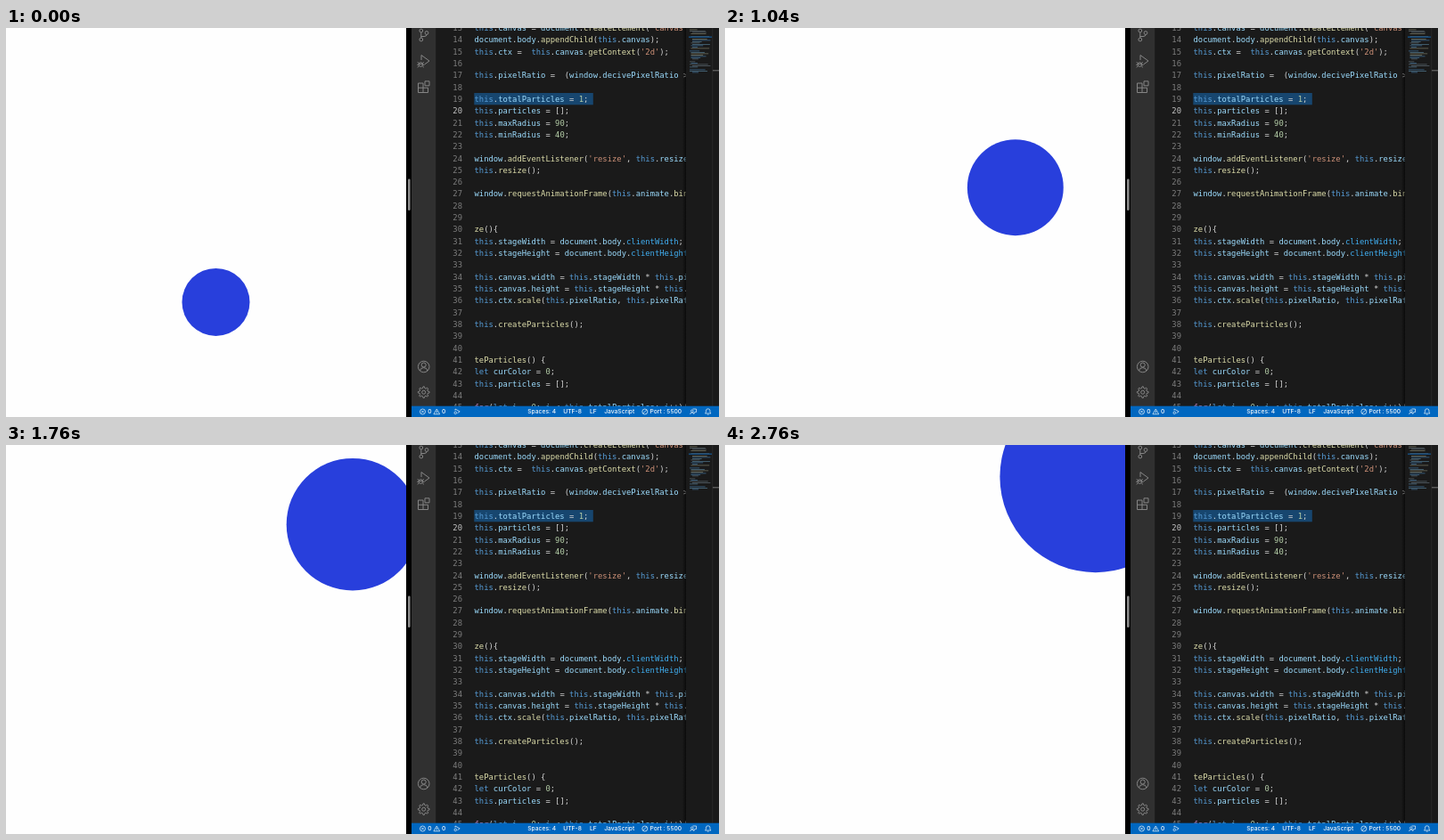
Animation, 800 px wide and 437 px high, one loop 2800 ms. Source, as an HTML page with a canvas:

```html
<!DOCTYPE html>
<html lang="en">
<head>
<meta charset="utf-8">
<style>
html, body { margin: 0; width: 100%; height: 100%; overflow: hidden; background: #fefefe; }
canvas { display: block; }
</style>
</head>
<body>
<canvas id="stage" width="800" height="437"></canvas>
<script>
const ctx = document.getElementById('stage').getContext('2d');
const LOOP = 2800, STEP = 40, PAGE_WIDTH = 449;
const CHAR = 5.328, LINE = 13.33;
const CODE_FONT = '8.85px "DejaVu Sans Mono", monospace';

const code = {
  13: "this.canvas = document.createElement('canvas');",
  14: "document.body.appendChild(this.canvas);",
  15: "this.ctx =  this.canvas.getContext('2d');",
  17: "this.pixelRatio =  (window.decivePixelRatio > 1) ? 2 : 1;",
  19: "this.totalParticles = 1;",
  20: "this.particles = [];",
  21: "this.maxRadius = 90;",
  22: "this.minRadius = 40;",
  24: "window.addEventListener('resize', this.resize.bind(this));",
  25: "this.resize();",
  27: "window.requestAnimationFrame(this.animate.bind(this));",
  30: "ze(){",
  31: "this.stageWidth = document.body.clientWidth;",
  32: "this.stageHeight = document.body.clientHeight;",
  34: "this.canvas.width = this.stageWidth * this.pixelRatio;",
  35: "this.canvas.height = this.stageHeight * this.pixelRatio;",
  36: "this.ctx.scale(this.pixelRatio, this.pixelRatio);",
  38: "this.createParticles();",
  41: "teParticles() {",
  42: "let curColor = 0;",
  43: "this.particles = [];",
  45: "for(let i = 0; i < this.totalParticles; i++){"
};

function rect(x, y, w, h, color) {
  ctx.fillStyle = color;
  ctx.fillRect(x, y, w, h);
}

function text(str, x, y, color) {
  ctx.fillStyle = color;
  ctx.fillText(str, x, y);
}

function stroke(path, color, width = 1) {
  ctx.strokeStyle = color;
  ctx.lineWidth = width;
  ctx.stroke(new Path2D(path));
}

const ring = (x, y, r) =>
  `M${x - r} ${y}a${r} ${r} 0 1 0 ${2 * r} 0a${r} ${r} 0 1 0 ${-2 * r} 0`;

function tokenColor(token, next) {
  if (/^'/.test(token)) return '#ce9178';
  if (/^(this|let)$/.test(token)) return '#569cd6';
  if (token === 'for') return '#c586c0';
  if (/^\d/.test(token)) return '#b5cea8';
  if (/^client/.test(token)) return '#40aef0';
  if (/^\w/.test(token)) return next === '(' ? '#dcdcaa' : '#9cdcfe';
  return '#d4d4d4';
}

function drawCode() {
  ctx.font = CODE_FONT;
  for (let n = 13; n <= 45; n++) {
    const y = 16.2 + (n - 14) * LINE;
    text(n, 512 - 2 * CHAR, y, n === 20 ? '#c6c6c6' : '#7d7d7d');
    for (const m of (code[n] || '').matchAll(/'[^']*'|\w+|[^\w\s']+/g)) {
      const next = code[n][m.index + m[0].length];
      text(m[0], 525.5 + m.index * CHAR, y, tokenColor(m[0], next));
    }
  }
}

function drawMinimap() {
  const shadow = ctx.createLinearGradient(759, 0, 763, 0);
  shadow.addColorStop(0, '#0000');
  shadow.addColorStop(1, '#0009');
  rect(759, 0, 4, 425, shadow);
  rect(763, 0, 37, 425, '#1a1a1a');
  let seed = 7;
  const random = () => (seed = seed * 16807 % 2147483647) / 2147483647;
  const tints = ['#4c7186', '#3d6a8f', '#737360', '#56626a'];
  for (let y = 0; y < 51; y += 1.5) {
    if (random() < 0.17) continue;
    const x = 767 + Math.floor(random() * 3) * 1.5;
    const w = 5 + random() * 17;
    rect(x, y, w, 0.75, tints[Math.floor(random() * 4)]);
  }
  rect(766, 9.5, 26, 1.3, '#17548a');
  rect(792.5, 0, 0.7, 425, '#303030');
  rect(793, 47.3, 7, 1, '#777');
}

function drawActivityBar() {
  rect(455, 0, 27.5, 425, '#303030');
  const gray = '#858585';
  stroke(ring(465.8, 3, 1.9) + ring(465.8, 13, 1.9) + ring(472, 5.5, 1.9)
    + 'M465.8 5V11M472 7.4Q472 9.5 469 9.5H465.8', gray);
  stroke('M466 36V30.5L475 37L469.5 41' + ring(465.3, 41, 2.3)
    + 'M461.7 38.5L463.4 39.6M461.3 41.4H463M461.7 44.2L463.4 42.8'
    + 'M468.9 38.5L467.2 39.6M469.3 41.4H467.6M468.9 44.2L467.2 42.8M463 40.4H467.6', gray);
  stroke('M462.5 62H468V72.5H462.5ZM462.5 67.2H473.5V72.5H468M470 59.8H475V64.8H470Z', gray);
  stroke(ring(468.7, 380.5, 6.3) + ring(468.7, 378.5, 2.5)
    + 'M464.5 385Q465 381.6 468.7 381.6T472.9 385', gray);
  let gear = '';
  for (let i = 0; i < 32; i++) {
    const r = i % 4 < 2 ? 6.4 : 4.6;
    const a = (i - 0.5) * Math.PI / 16;
    gear += (i ? 'L' : 'M') + (468.7 + r * Math.cos(a)) + ' ' + (409.2 + r * Math.sin(a));
  }
  stroke(gear + 'Z' + ring(468.7, 409.2, 2), gray);
}

function drawStatusBar() {
  const white = '#f4f8fc';
  rect(455, 424.7, 345, 12.3, '#0067c0');
  ctx.font = '500 6.7px Inter, sans-serif';
  const labels = [['0', 473.2], ['0', 489], ['Spaces: 4', 585.3], ['UTF-8', 625.3],
    ['LF', 655], ['JavaScript', 671.2], ['Port : 5500', 722.5]];
  for (const [label, x] of labels) text(label, x, 433.4, white);
  stroke(ring(467.5, 431, 3) + 'M466.2 429.7L468.8 432.3M468.8 429.7L466.2 432.3'
    + 'M483.3 428L486.7 433.8H479.9ZM483.3 430V432M483.3 432.5V433.2', white, 0.7);
  stroke('M504 429.6V428L509.2 430.8L506.5 432.7' + ring(504.3, 432.3, 1.3), white, 0.7);
  stroke(ring(716.8, 431, 3) + 'M714.7 433.1L718.9 428.9', white, 0.7);
  stroke(ring(769.8, 430.3, 1.3) + 'M767.6 434Q767.8 432 769.8 432T772 434'
    + 'M770.5 428H774.5V431.5H773.2L772 432.6V431.5', white, 0.7);
  stroke('M784.5 433H790.9L790 431.6V430Q790 427.8 787.7 427.8T785.4 430V431.6Z'
    + 'M787 434.2H788.4', white, 0.7);
}

function drawEditor() {
  rect(PAGE_WIDTH, 0, 351, 437, '#000');
  rect(482.5, 0, 317.5, 425, '#1a1a1a');
  rect(525.3, 73, 133.5, 13.3, '#17466f');
  drawCode();
  drawMinimap();
  drawActivityBar();
  drawStatusBar();
  ctx.fillStyle = '#8c8c8c';
  ctx.beginPath();
  ctx.roundRect(451, 169.5, 2.6, 35.5, 1.3);
  ctx.fill();
}

// The ball drifts at constant speed, bounces at its centre and swells along a sine.
function drawBall(ms) {
  const wall = 446.2;
  const moved = Math.max(ms, 10);
  const x = wall - Math.abs(wall - (234.6 + 0.0877 * moved));
  const y = Math.abs(309.2 - 0.125 * moved);
  const r = 38 + 56 * (Math.cos(0.17) - Math.cos(0.17 + 0.0006 * ms));
  ctx.save();
  ctx.beginPath();
  ctx.rect(0, 0, PAGE_WIDTH, 437);
  ctx.clip();
  rect(0, 0, PAGE_WIDTH, 437, '#fefefe');
  ctx.fillStyle = '#283fdc';
  ctx.beginPath();
  ctx.arc(x, y, r, 0, 2 * Math.PI);
  ctx.fill();
  ctx.restore();
}

function animate() {
  drawBall(Math.floor(performance.now() % LOOP / STEP) * STEP);
  requestAnimationFrame(animate);
}

drawEditor();
animate();
</script>
</body>
</html>
```
